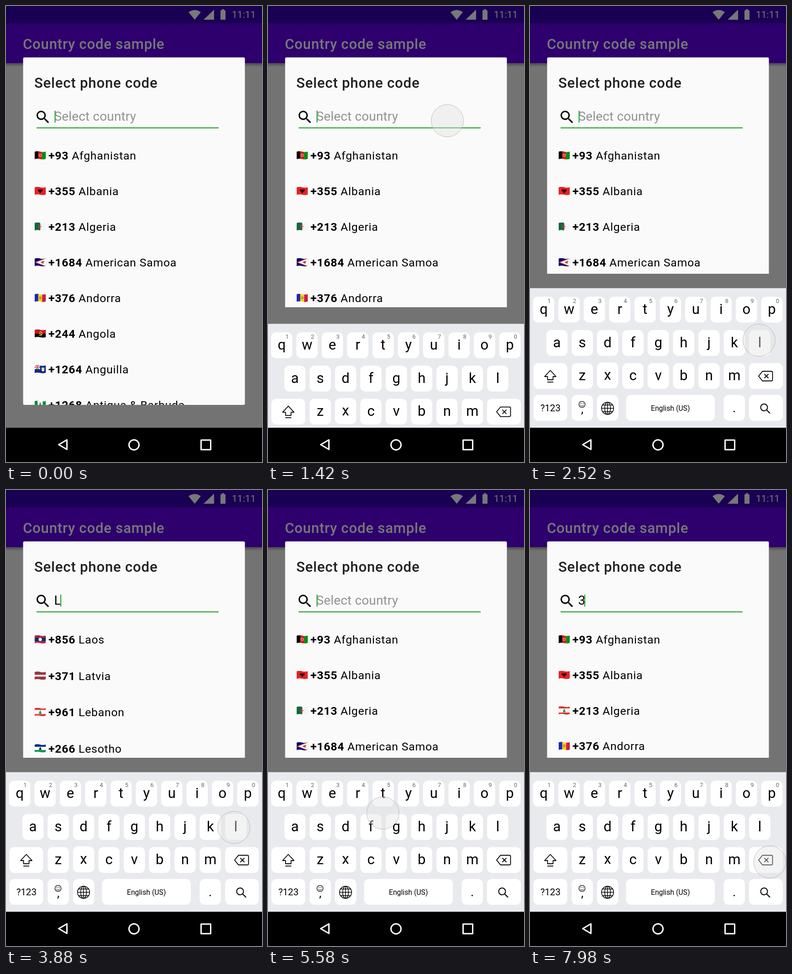
Recreate the animation shown at these times as an HTML page. Size 561x998 px, loop 8 s.

```html
<!DOCTYPE html>
<html lang="en">
<head>
<meta charset="utf-8">
<title>Country code picker</title>
<style>
html, body { margin: 0; width: 100%; height: 100%; overflow: hidden; background: #000; }
svg { display: block; width: 561px; height: 998px; font-family: Roboto, sans-serif; }
.title { font-size: 31.2px; font-weight: 500; letter-spacing: .75px; }
.row { font-size: 24.8px; letter-spacing: .75px; }
.field { font-size: 28px; letter-spacing: .15px; }
.key { font-size: 31px; text-anchor: middle; }
.line { fill: none; stroke: #000; stroke-width: 1.8; }
.nav { fill: none; stroke: #fff; stroke-width: 3; stroke-linejoin: round; }
</style>
</head>
<body>
<svg viewBox="0 0 561 998">
  <defs>
    <clipPath id="stage"><rect width="561" height="923"/></clipPath>
    <clipPath id="body"><rect id="bodyRect" x="37" y="112" width="487"/></clipPath>
    <clipPath id="wave"><path d="M0 1.5Q6-.6 12.5 1.2T25 1V17Q18.5 19.4 12.5 17.6T0 17.8Z"/></clipPath>
    <linearGradient id="shade" x2="0" y2="1">
      <stop stop-opacity=".35"/><stop offset="1" stop-opacity="0"/>
    </linearGradient>
  </defs>

  <rect width="561" height="998" fill="#737373"/>
  <rect y="125" width="561" height="8" fill="url(#shade)"/>
  <rect width="561" height="125" fill="#2d006d"/>
  <rect width="561" height="38" fill="#1a0053"/>
  <g fill="#787878">
    <path d="M400 13.5Q413.5 4 427 13.5L413.5 30ZM433 30H456V8ZM473 7h5v2.5h3V30h-11V9.5h3Z"/>
    <text x="495" y="26" font-size="21">11:11</text>
    <text class="title" x="37" y="93.5">Country code sample</text>
  </g>

  <g clip-path="url(#body)">
    <rect x="37.5" y="112.5" width="486" height="760.5" rx="3" fill="#fafafa"/>
    <text class="title" x="62" y="179" fill="#212121">Select phone code</text>
    <path transform="translate(62.3 224.5) scale(1.558)" d="M15.5 14h-.79l-.28-.27C15.41 12.59 16 11.11 16 9.5 16 5.91 13.09 3 9.5 3S3 5.91 3 9.5 5.91 16 9.5 16c1.61 0 3.09-.59 4.23-1.57l.27.28v.79l5 4.99L20.49 19l-4.99-5zm-6 0C7.01 14 5 11.99 5 9.5S7.01 5 9.5 5 14 7.01 14 9.5 11.99 14 9.5 14z"/>
    <text id="field" class="field" x="105.5" y="250.5"></text>
    <rect id="caret" y="229" width="2.6" height="26" fill="#43ae4a"/>
    <rect x="67" y="265.4" width="399" height="2.6" fill="#43ae4a"/>
    <g id="lists"></g>
  </g>

  <g clip-path="url(#stage)"><g id="keyboard"></g></g>

  <rect y="923" width="561" height="75"/>
  <g class="nav">
    <path d="M115.5 960 133.5 949.5V970.5Z"/>
    <circle cx="280.5" cy="960.5" r="11"/>
    <rect x="427.5" y="950" width="21" height="21"/>
  </g>
  <circle id="touch" r="35.4" fill="#e0e0e0" stroke="#aaa" stroke-opacity=".75"/>
</svg>

<script>
const $ = id => document.getElementById(id);
const rect = (x, y, w, h, c) => `<rect x="${x}" y="${y}" width="${w}" height="${h}" fill="${c}"/>`;
const path = (d, c, extra = '') => `<path d="${d}" fill="${c}" ${extra}/>`;
const dot = (x, y, r, c) => `<circle cx="${x}" cy="${y}" r="${r}" fill="${c}"/>`;

// Stripes take relative sizes: [colour, size] pairs across 25 or down 19 units
function stripes(vertical, ...parts) {
  let at = 0;
  return parts.map(([c, n]) => {
    const s = vertical ? rect(at, 0, n, 19, c) : rect(0, at, 25, n, c);
    at += n;
    return s;
  }).join('');
}
const tree = path('M12.5 5 16 13H13.2V14.5H11.8V13H9Z', '#15a04a');

const flags = {
  af: stripes(1, ['#050505', 8.3], ['#cf1c10', 8.4], ['#008d12', 8.3]) +
      dot(12.5, 9.3, 3.4, '#e3907f') + dot(12.5, 9.5, 1.7, '#cf1c10'),
  al: rect(0, 0, 25, 19, '#e92025') +
      path('M8 5 11 6.5 12.5 5 14 6.5 17 5 18 9 15 11 12.5 15 10 11 7 9Z', '#2a0808'),
  dz: stripes(1, ['#0a6a3a', 12.5], ['#f4f4f4', 12.5]) +
      path('M15 6.4A4.2 4.2 0 1 0 15 12.4 3.3 3.3 0 1 1 15 6.4Z', '#d52b3f') + dot(14, 9.4, 1.2, '#d52b3f'),
  as: rect(0, 0, 25, 19, '#06066e') +
      path('M1 9.5 26 0V19Z', '#fff', 'stroke="#b8203c" stroke-width="1.4"') +
      path('M13 9 20 6 22 8 19 9.5 21 12 17 12Z', '#9a5a22'),
  ad: stripes(1, ['#1a28b4', 8.3], ['#f9d616', 8.4], ['#d41a35', 8.3]) +
      rect(9.8, 6, 5.4, 6.5, '#cf8f4a'),
  ao: stripes(0, ['#cf1126', 9.4], ['#080808', 9.6]) +
      path('M11.5 5.5A4 4 0 1 1 10 12.5M10 8 16 13', 'none', 'stroke="#f2cd1a" stroke-width="1.5"') +
      dot(11.8, 8.8, 1.1, '#f2cd1a'),
  ai: rect(0, 0, 25, 19, '#0b2a80') +
      path('M0 1 12 9M12 1 0 9M6 0V10M0 5H12', 'none', 'stroke="#fff" stroke-width="2.6"') +
      path('M6 0V10M0 5H12', 'none', 'stroke="#cf1b2b" stroke-width="1.4"') +
      path('M15.5 6H21.5V11Q21 13.5 18.5 14.5 16 13.5 15.5 11Z', '#eee') + dot(18.5, 9, 1.6, '#e79a2c'),
  ag: stripes(1, ['#0f8a43', 7], ['#f7f7f7', 11], ['#0f8a43', 7]) +
      path('M12.5 3 16 15H9Z', '#0f8a43'),
  la: stripes(0, ['#ce1126', 5], ['#0a2a72', 9], ['#ce1126', 5]) + dot(12.5, 9.5, 3.6, '#fff'),
  lv: stripes(0, ['#9b3340', 7.6], ['#f3f0f0', 3.8], ['#9b3340', 7.6]),
  lb: stripes(0, ['#ee2229', 5], ['#fff', 9], ['#ee2229', 5]) + tree,
  ls: stripes(0, ['#0a2a9a', 6], ['#fff', 7], ['#0a9a4a', 6]) + path('M12.5 6 15.5 12.5H9.5Z', '#000'),
};

function list(id, pitch, rows) {
  return `<g id="${id}">` + rows.map(([flag, code, name], i) => {
    const y = 327 + i * pitch;
    return `<g transform="translate(62.5 ${y - 9.5})" clip-path="url(#wave)">${flags[flag]}</g>
      <text class="row" x="93" y="${y + 9}"><tspan font-weight="700">+${code}</tspan> ${name}</text>`;
  }).join('') + '</g>';
}

$('lists').innerHTML =
  list('all', 78, [
    ['af', 93, 'Afghanistan'], ['al', 355, 'Albania'], ['dz', 213, 'Algeria'],
    ['as', 1684, 'American Samoa'], ['ad', 376, 'Andorra'], ['ao', 244, 'Angola'],
    ['ai', 1264, 'Anguilla'], ['ag', 1268, 'Antigua &amp; Barbuda']]) +
  list('letter', 79.5, [
    ['la', 856, 'Laos'], ['lv', 371, 'Latvia'], ['lb', 961, 'Lebanon'], ['ls', 266, 'Lesotho']]) +
  list('digit', 77.8, [
    ['af', 93, 'Afghanistan'], ['al', 355, 'Albania'], ['lb', 213, 'Algeria'], ['ad', 376, 'Andorra']]);

const key = (x, y, w) => `<rect x="${x}" y="${y}" width="${w}" height="56.5" rx="11" fill="#fff"/>`;
const label = (x, y, s, size = 31, c = '#000') =>
  `<text class="key" x="${x}" y="${y}" style="font-size:${size}px" fill="${c}">${s}</text>`;
const letters = (s, x0, y) => [...s].map((ch, i) => {
  const x = x0 + i * 55.55, top = ch == 'x' ? y - 1.3 : y;
  return key(x - 23.3, top, 46.6) + label(x, top + 37.5, ch);
}).join('');

$('keyboard').innerHTML =
  rect(0, 617.5, 561, 320, '#e8eaee') +
  letters('qwertyuiop', 30, 636.3) +
  [...'1234567890'].map((n, i) => label(42 + i * 55.6, 650.3, n, 13, '#666')).join('') +
  letters('asdfghjkl', 59, 709.2) +
  letters('zxcvbnm', 114.5, 781.5) +
  key(7.5, 781.5, 74) + key(480, 781.5, 74) +
  [[7.5, 74], [91.2, 46.6], [147, 46.6], [210.5, 194.5], [424.3, 46.6], [480, 74]]
    .map(([x, w]) => key(x, 851.2, w)).join('') +
  label(44.8, 887, '?123', 20.5) + label(307.7, 885.5, 'English (US)', 15.8) +
  label(447.5, 888.5, '.', 27) + label(114.5, 890.5, ',', 26) +
  `<g class="line">
    <path d="M44.5 797.5 32 811H38.5V818H50.5V811H57Z" stroke-linejoin="round"/>
    <path d="M38 823H51"/>
    <path d="M501 810 509.5 799.5H529Q531.5 799.5 531.5 802V818Q531.5 820.5 529 820.5H509.5ZM513.5 805.5 522.5 814.5M522.5 805.5 513.5 814.5"/>
    <circle cx="114" cy="872" r="6.7" stroke-width="1.3"/>
    <path d="M110.5 873.5Q114 878 117.5 873.5" stroke-width="1.2"/>
    <path d="M111.7 869.3V871M116.3 869.3V871" stroke-width="1.5"/>
    <g stroke-width="1.5"><circle cx="170" cy="880.5" r="13.3"/><ellipse cx="170" cy="880.5" rx="6.3" ry="13.3"/>
    <path d="M170 867V894M156.7 880.5H183.3M159 873.3H181M159 887.7H181"/></g>
    <circle cx="513" cy="878.5" r="7.5" stroke-width="2"/>
    <path d="M518.5 884 526 891.5" stroke-width="2.2"/>
  </g>`;

// Standard "ease" curve, cubic-bezier(.25, .1, .25, 1)
function ease(t) {
  if (t <= 0) return 0;
  if (t >= 1) return 1;
  const curve = (a, b, s) => 3 * a * s * (1 - s) ** 2 + 3 * b * s * s * (1 - s) + s ** 3;
  let lo = 0, hi = 1;
  for (let i = 0; i < 24; i++) {
    const mid = (lo + hi) / 2;
    if (curve(.25, .25, mid) < t) lo = mid; else hi = mid;
  }
  return curve(.1, 1, lo);
}

// Each move: start, duration, control point, end point
const moves = [
  [460, 820, 440, 110, 393, 251],
  [1740, 940, 587, 561, 499, 737.5],
  [3860, 780, 512, 775, 522.5, 812.5],
  [5200, 900, 333, 739, 143.5, 664.5],
  [6800, 1000, 334, 738, 525.5, 814],
];
function touchAt(t) {
  let p = [500, -40];
  for (const [start, dur, cx, cy, x, y] of moves) {
    if (t < start) break;
    const u = ease((t - start) / dur), v = 1 - u;
    p = [v * v * p[0] + 2 * u * v * cx + u * u * x, v * v * p[1] + 2 * u * v * cy + u * u * y];
  }
  return p;
}

const within = (t, a, b) => t >= a && t < b;
const show = (id, on) => $(id).setAttribute('display', on ? 'inline' : 'none');

function draw(t) {
  const up = ease((t - 1260) / 360);
  $('keyboard').setAttribute('transform', `translate(0 ${305.5 * (1 - up)})`);
  $('bodyRect').setAttribute('height', 761 - 287 * up);

  const hint = t < 3060 || within(t, 4680, 6300);
  $('field').textContent = hint ? 'Select country' : t < 4640 ? 'L' : t < 4680 ? '' : '3';
  $('field').setAttribute('fill', hint ? '#929292' : '#000');
  $('caret').setAttribute('x', hint ? 106.3 : 118.7);

  const letter = within(t, 3120, 4700), digit = t >= 6360;
  show('letter', letter);
  show('digit', digit);
  show('all', !letter && !digit);

  const [x, y] = touchAt(t);
  $('touch').setAttribute('cx', x);
  $('touch').setAttribute('cy', y);
  const pressed = within(t, 3000, 3220) || within(t, 6240, 6420);
  $('touch').setAttribute('fill-opacity', pressed ? .5 : .4);
}

const begin = performance.now();
function tick() {
  draw((performance.now() - begin) % 8000);
  requestAnimationFrame(tick);
}
tick();
</script>
</body>
</html>
```
